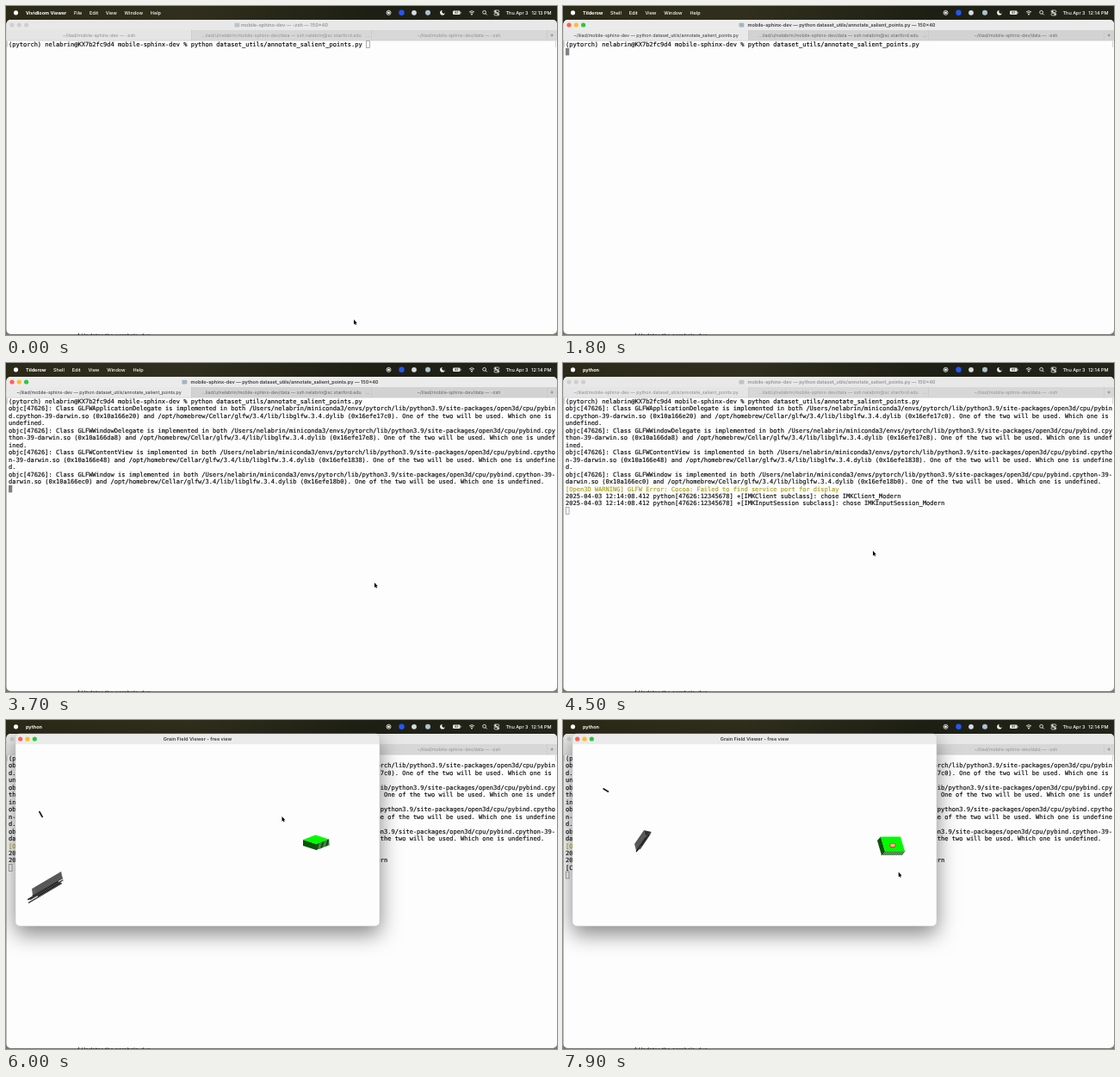
An HTML page with a canvas that plays this animation: 640x382 px, repeating every 8000 ms.

```html
<!DOCTYPE html>
<html lang="en">
<head>
<meta charset="utf-8">
<title>Annotating points</title>
<style>
html, body { margin: 0; width: 100%; height: 100%; overflow: hidden; background: #23221a; }
canvas { display: block; width: 640px; height: 382px; }
</style>
</head>
<body>
<canvas id="stage"></canvas>
<script>
const W = 640, H = 382, LOOP = 8000;
const canvas = document.getElementById('stage');
const ctx = canvas.getContext('2d');
const dpr = window.devicePixelRatio || 1;
canvas.width = W * dpr;
canvas.height = H * dpr;

const UI = 'Inter, "Liberation Sans", sans-serif';
const MONO = '7.04px "DejaVu Sans Mono", "Liberation Mono", monospace';
const COL = 4.238, ROW = 8.46, COLS = 150;
const USER = 'nelabrin', HOST = 'KX7b2fc9d4';
const SCRIPT = 'python dataset_utils/annotate_salient_points.py';
const PROMPT = `(pytorch) ${USER}@${HOST} mobile-sphinx-dev % ${SCRIPT}`;

// Moments of hard change, in ms
const T = { focus: 500, enter: 800, title: 1000, clock: 1200, log: 3100, app: 4300, view: 4700, pick: 7500 };

const wrap = s => s.match(new RegExp(`.{1,${COLS}}`, 'g'));
const clash = (name, a, b) => wrap(
  `objc[47626]: Class ${name} is implemented in both /Users/${USER}/miniconda3/envs/pytorch/lib/python3.9` +
  `/site-packages/open3d/cpu/pybind.cpython-39-darwin.so (0x10a166${a}) and /opt/homebrew/Cellar/glfw/3.4/lib` +
  `/libglfw.3.4.dylib (0x16efe${b}). One of the two will be used. Which one is undefined.`);
const LOG = [
  ...clash('GLFWApplicationDelegate', 'e20', '17c0'),
  ...clash('GLFWWindowDelegate', 'da8', '17e8'),
  ...clash('GLFWContentView', 'e48', '1838'),
  ...clash('GLFWWindow', 'ec0', '18b0')
];
const chose = c =>
  `2025-04-03 12:14:08.412 python[47626:12345678] +[${c} subclass]: chose ${c}_Modern`;
const OPENED = [
  '[Open3D WARNING] GLFW Error: Cocoa: Failed to find service port for display',
  chose('IMKClient'),
  chose('IMKInputSession')
];

function text(s, x, y, { size = 5.5, weight = 400, color = '#fff', align = 'left' } = {}) {
  ctx.font = `${weight} ${size}px ${UI}`;
  ctx.fillStyle = color;
  ctx.textAlign = align;
  ctx.fillText(s, x, y);
  return ctx.measureText(s).width;
}
function rect(x, y, w, h, color) {
  ctx.fillStyle = color;
  ctx.fillRect(x, y, w, h);
}
function disc(x, y, r, color, squash = 1) {
  ctx.fillStyle = color;
  ctx.beginPath();
  ctx.ellipse(x, y, r, r * squash, 0, 0, 7);
  ctx.fill();
}
function ring(x, y, r, from = 0, to = Math.PI * 2) {
  ctx.strokeStyle = '#fff';
  ctx.lineWidth = 0.8;
  ctx.beginPath();
  ctx.arc(x, y, r, from, to);
  ctx.stroke();
}
function line(a, b, color, width) {
  ctx.strokeStyle = color;
  ctx.lineWidth = width;
  ctx.beginPath();
  ctx.moveTo(...a);
  ctx.lineTo(...b);
  ctx.stroke();
}
function poly(pts, color) {
  ctx.fillStyle = color;
  ctx.beginPath();
  for (const p of pts) ctx.lineTo(...p);
  ctx.fill();
}
function box(x, y, w, h, r, color) {
  ctx.fillStyle = color;
  ctx.beginPath();
  ctx.roundRect(x, y, w, h, r);
  ctx.fill();
}
const noise = n => {
  const v = Math.sin(n * 12.9898) * 43758.5453;
  return v - Math.floor(v);
};

// keys: [time, values] pairs; smooth steps between them
function track(keys, t) {
  const i = keys.findIndex(k => t < k[0]);
  if (i === 0) return keys[0][1];
  if (i < 0) return keys[keys.length - 1][1];
  const [t0, a] = keys[i - 1], [t1, b] = keys[i];
  const u = (t - t0) / (t1 - t0), e = u * u * (3 - 2 * u);
  return a.map((v, k) => v + (b[k] - v) * e);
}

function menuBar(t) {
  const g = ctx.createLinearGradient(0, 0, W, 0);
  ['#2b2917', '#302f1d', '#1e1f14', '#24251a'].forEach((c, i) => g.addColorStop(i / 3, c));
  rect(0, 0, W, 20, g);
  disc(11.5, 7.8, 2.6, '#fff');

  let name = 'Vividloom Viewer', items = 'File Edit View Window Help', x = 79;
  if (t >= T.app) {
    name = 'python';
    items = '';
  } else if (t >= T.focus) {
    name = 'Tilderow';
    items = 'Shell Edit View Window Help';
    x = 55;
  }
  text(name, 23, 9.9, { weight: 700 });
  for (const s of items.split(' ')) x += text(s, x, 9.9, { weight: 500 }) + 8.8;

  const y = 7.8;
  ring(444.5, y, 2.5);
  disc(444.5, y, 1.4, '#fff');
  disc(459.5, y, 3.2, '#2457f5');
  disc(474, y, 2.9, '#d9dde2');
  disc(490, y, 3, '#a9c3d2');
  // Moon
  disc(507, y, 2.8, '#fff');
  disc(508.5, y - 1.2, 2.3, '#24241a');
  // Battery
  box(519, 5.6, 8.6, 4.4, 1.2, '#e9e9e4');
  rect(528, 7, 0.7, 1.6, '#bbb');
  text('61', 523.3, 9.2, { size: 3.6, weight: 700, color: '#333', align: 'center' });
  // Wireless
  for (const r of [4.6, 2.9]) ring(541, 10.4, r, -2.3, -0.84);
  disc(541, 9.6, 0.9, '#fff');
  // Search
  ring(555.6, 7.3, 1.9);
  line([557, 8.7], [558.6, 10.3], '#fff', 0.9);
  // Switches
  for (const i of [0, 1]) {
    ctx.lineWidth = 0.7;
    ctx.beginPath();
    ctx.roundRect(567, 5 + i * 3.4, 5.8, 2.5, 1.2);
    ctx.stroke();
    disc(568.6 + i * 2.8, 6.2 + i * 3.4, 0.9, '#fff');
  }
  text('Thu Apr 3', 580.5, 9.9, { weight: 500 });
  text(t < T.clock ? '12:13 PM' : '12:14 PM', 633.5, 9.9, { weight: 500, align: 'right' });
}

function lights(x, y, on) {
  ['#fe5f57', '#febc2e', '#28c840'].forEach((c, i) => disc(x + i * 8.3, y, 2.6, on ? c : '#cfcfcf'));
}
function title(s, x, color) {
  text(s, x, 24, { size: 5.6, weight: 600, color, align: 'center' });
}

function tabs(job, active) {
  const ink = active ? '#333' : '#8b8b8b', faint = active ? '#666' : '#929292';
  rect(0, 28, W, 12.2, active ? '#d2d2d2' : '#d7d7d7');
  rect(0, 28, 215, 12.2, active ? '#e9e9e9' : '#e5e5e5');
  for (const x of [215, 424.5, 628]) rect(x, 28, 0.5, 12.2, '#c2c2c2');
  rect(0, 39.8, W, 0.5, '#c9c9c9');
  const label = (s, x, color) => text(s, x, 35.9, { size: 5.32, color, align: 'center' });
  label(`~/iliad/mobile-sphinx-dev — ${job}`, 108, ink);
  label(`…liad/u/${USER}/mobile-sphinx-dev/data — ssh ${USER}@sc.stanford.edu`, 320, faint);
  label('…', 420, faint);
  label('~/iliad/mobile-sphinx-dev/data — -zsh', 526, faint);
  text('+', 634, 36.2, { size: 7, color: '#666', align: 'center' });
}

function shell(t) {
  const active = t >= T.focus && t < T.app;
  const running = t >= T.title;
  const job = running ? SCRIPT : '-zsh';
  ctx.save();
  ctx.beginPath();
  ctx.roundRect(0.5, 16, 639.5, 365, 5);
  ctx.clip();
  rect(0, 16, W, 366, '#fdfdfd');
  rect(0, 16, W, 12, active ? '#ebebeb' : '#e8e8e8');
  lights(7, 22, active);
  title(`mobile-sphinx-dev — ${job} — 150×40`, 323.5, active ? '#3c3c3c' : '#969696');
  box(running ? 204.5 : 265.5, 19.8, 5.8, 4.6, 0.6, active ? '#9fb6c3' : '#bcc3c7');
  tabs(job, active);

  const rows = [PROMPT];
  if (t >= T.log) rows.push(...LOG);
  if (t >= T.app) rows.push(...OPENED);
  if (t >= T.pick) rows.push('[Clicked] nearest point selected');
  ctx.font = MONO;
  ctx.textAlign = 'left';
  ctx.lineWidth = 0.15;
  rows.forEach((s, i) => {
    ctx.fillStyle = ctx.strokeStyle = s.startsWith('[Open3D') ? '#a8a018' : '#0a0a0a';
    ctx.fillText(s, 3, 47 + i * ROW);
    ctx.strokeText(s, 3, 47 + i * ROW);
  });
  for (const x of [1, 638.3]) rect(x, 40.8, 0.5, 7, '#aaa');

  const typed = t < T.enter;
  const x = typed ? 3 + (PROMPT.length + 1) * COL : 3;
  const y = 40.4 + (typed ? 0 : rows.length) * ROW;
  if (active) {
    rect(x, y, COL, ROW, '#828282');
  } else {
    ctx.strokeStyle = '#8a8a8a';
    ctx.lineWidth = 0.7;
    ctx.strokeRect(x + 0.3, y + 0.3, COL - 0.5, ROW - 0.6);
  }
  ctx.restore();
  text('1.Updates the parabola_duo', 83, 384.8, { size: 6.5, color: '#111' });
}

// The view turns through three poses while it is dragged
const pose = (t, a, b, c) => track([[5400, a], [6000, b], [6700, c]], t);

// A slab from a corner and three edges; at(i, j, k) is a point in it
function slab([ox, oy, ux, uy, vx, vy, hx, hy]) {
  return (i, j, k) => [ox + ux * i + vx * j + hx * k, oy + uy * i + vy * j + hy * k];
}

function cloud(t) {
  const at = slab(pose(t,
    [62, 123, -3, 24, 8, 6, 5, -4],
    [64, 176, -34, 20, 1, 7, 2, 6],
    [94, 128, -11, 16, 2, 8, 7, -6]));
  poly([at(0, 0, 0), at(1, 0, 0), at(1, 1, 0), at(0, 1, 0)], '#5e5e5e');
  poly([at(0, 0, 0), at(0, 1, 0), at(0, 1, 1)], '#333');
  // Rows of points, ragged at both ends
  for (let i = 0; i < 5; i++) {
    const k = (i + 0.5) / 5;
    line(at(noise(i) * 0.15, 1, k), at(0.8 + noise(i + 9) * 0.4, 1, k), i % 2 ? '#111' : '#3a3a3a', 1.3);
    line(at(0, k, 0), at(0.9, k, 0), '#4c4c4c', 0.5);
  }
  const [x, y, dx, dy] = pose(t, [67, 124, 1, 5], [38.5, 106, 4, 7], [46.5, 79.5, 6.5, 4]);
  line([x, y], [x + dx, y + dy], '#1c1c1c', 1.7);
}

function block(t) {
  const at = slab(pose(t,
    [346, 113, 17, 0, 0, 17, -5.5, 0.5],
    [345, 139, 14.5, -5.5, 15.5, 5, 0, 7],
    [369, 135.5, 23, 0, 5, 17, -4, 4.5]));
  poly([at(0, 0, 1), at(0, 0, 0), at(0, 1, 0), at(0, 1, 1)], '#085508');
  for (let i = 0; i <= 12; i++) {
    line(at(i / 12, 0.97, 0), at(i / 12, 1, 1), '#075007', 1.15);
  }
  poly([at(0, 0, 0), at(1, 0, 0), at(1, 1, 0), at(0, 1, 0)], '#00fb00');
  if (t >= T.pick) {
    disc(383, 145.8, 3.8, '#b5562c', 0.8);
    disc(383, 145.4, 2.8, '#f0b48c', 0.7);
  }
}

function viewer(t) {
  ctx.save();
  ctx.shadowColor = 'rgba(0,0,0,0.48)';
  ctx.shadowBlur = 25 * dpr;
  ctx.shadowOffsetY = 9 * dpr;
  box(11, 16, 423, 223.3, 5, '#fdfdfd');
  ctx.restore();
  box(11, 16, 423, 12.3, [5, 5, 0, 0], '#ebebeb');
  ctx.strokeStyle = '#c4c4c4';
  ctx.lineWidth = 0.5;
  ctx.beginPath();
  ctx.roundRect(11, 16, 423, 223.3, 5);
  ctx.stroke();
  lights(16.7, 22, true);
  title('Grain Field Viewer - free view', 222.5, '#3c3c3c');
  cloud(t);
  block(t);
}

const MOUSE = [
  [0, [404, 364]], [2300, [436, 266]], [3700, [428, 255]], [5100, [316, 194]],
  [6000, [320.5, 112]], [6800, [348.5, 154.5]], [7400, [383, 146]], [7850, [389.7, 176.5]]
];
const ARROW = new Path2D('M0 0V5.8L1.3 4.7 2.1 6.5 3 6.1 2.2 4.3 3.9 4.2Z');
function mouse(t) {
  if (t >= T.enter && t < 2300) return;
  ctx.save();
  ctx.translate(...track(MOUSE, t));
  ctx.strokeStyle = '#fff';
  ctx.lineWidth = 0.9;
  ctx.stroke(ARROW);
  ctx.fillStyle = '#000';
  ctx.fill(ARROW);
  ctx.restore();
}

function draw(t) {
  ctx.setTransform(dpr, 0, 0, dpr, 0, 0);
  ctx.textRendering = 'geometricPrecision';
  rect(0, 0, W, H, '#777772');
  menuBar(t);
  shell(t);
  if (t >= T.view) viewer(t);
  mouse(t);
}

const start = performance.now();
function frame() {
  draw((performance.now() - start) % LOOP);
  requestAnimationFrame(frame);
}
draw(0);
requestAnimationFrame(frame);
</script>
</body>
</html>
```
